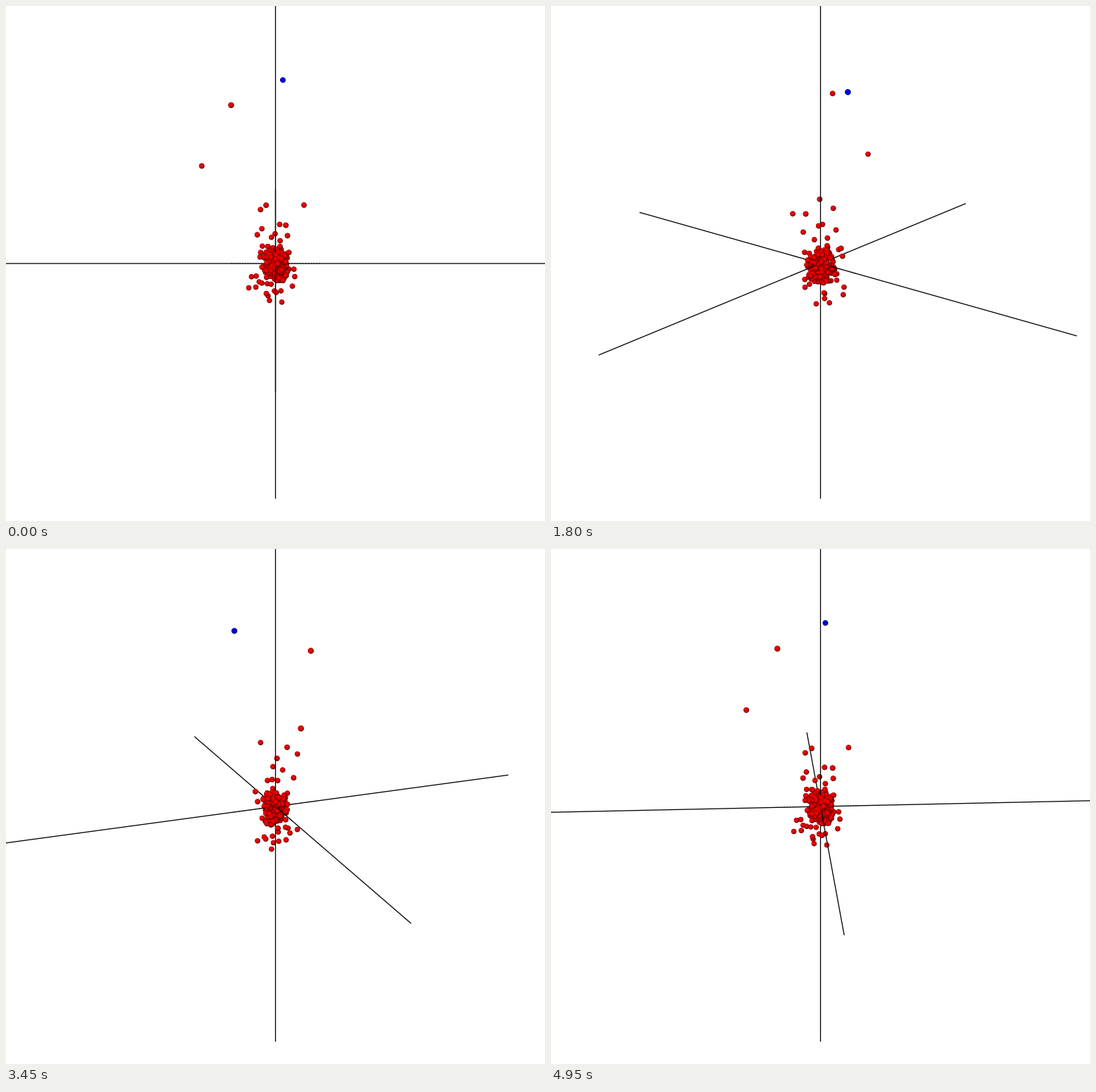
Animation, 765 px wide and 732 px high, one loop 5000 ms. Source, as a matplotlib script:

```python
import numpy as np
import matplotlib.pyplot as plt
from matplotlib.animation import FuncAnimation
from matplotlib.collections import LineCollection

W, H, DPI = 765, 732, 100
FRAMES, INTERVAL = 100, 50

# Orbiting camera: distance, focal length in pixels, elevation
DIST, FOCAL = 3.47, 1354.5
SIN_E, COS_E = np.sin(np.radians(20)), np.cos(np.radians(20))

DOT = 0.0198          # sphere diameter
AXIS_WIDTH = 1.3      # pixels
PT = 72 / DPI         # points per pixel

BLUE_POINT = [(0.0262, 0.642, -0.139)]
OUTLIERS = [
    (-0.149, 0.591, 0.067), (-0.2595, 0.361, -0.0134), (0.102, 0.216, -0.018),
    (-0.033, 0.230, 0.031), (-0.0535, 0.200, -0.0153), (0.036, 0.178, 0.100),
    (0.015, 0.148, -0.0035), (-0.0493, 0.1225, -0.032), (-0.0647, 0.1245, 0.0437),
    (0.0425, 0.1215, 0.045), (-0.0013, 0.1038, -0.0312), (0.0165, 0.0925, 0.015),
    (0.0234, -0.1516, 0.001), (-0.0223, -0.1555, -0.0245), (-0.031, -0.111, -0.082),
    (-0.061, -0.0955, -0.062), (-0.098, -0.0945, 0.002), (-0.0715, -0.0815, 0.0278),
    (-0.0875, -0.050, 0.004), (-0.071, -0.0565, -0.0197), (0.0205, -0.1217, -0.0365),
    (-0.0272, -0.1265, 0.002), (-0.033, -0.0885, 0.073), (0.0615, -0.080, 0.022),
    (0.070, -0.0452, 0.0154), (0.0675, -0.0262, -0.0105), (-0.004, -0.113, -0.0135),
    (0.0025, -0.093, 0.051), (-0.050, -0.080, -0.009), (-0.015, 0.0727, -0.083),
    (-0.028, 0.0385, -0.0795), (-0.048, 0.051, -0.046), (0.023, 0.0365, 0.056),
    (-0.013, -0.033, -0.057), (0.049, 0.038, -0.013), (-0.056, 0.027, 0.006),
    (-0.0535, 0.046, 0.010),
]

# Sphere shading, from the dark rim inwards: relative size, shift, brightness
SHADES = [(1.0, 0.0, 0.40), (0.86, -0.05, 0.76), (0.66, -0.09, 0.92)]


def make_cluster(count, seed=4):
    """Dense upright ellipsoid of points around the origin."""
    rng = np.random.default_rng(seed)
    pts = rng.normal(size=(count * 3, 3)) * (0.024, 0.037, 0.024)
    inside = ((pts / (0.054, 0.084, 0.054)) ** 2).sum(axis=1) < 1
    return pts[inside][:count] + (0, -0.006, 0)


def make_axes():
    """Three axes, cut finely near the origin so that depth sorting works."""
    knots = np.concatenate([[-1], np.linspace(-0.16, 0.16, 33), [1]])
    lines = [np.outer(knots, unit) for unit in np.eye(3)]
    starts = np.concatenate([line[:-1] for line in lines])
    ends = np.concatenate([line[1:] for line in lines])
    return starts, ends


def project(pts, angle):
    """Turn points about the vertical axis; return screen x, y and depth."""
    x, y, z = pts.T
    right = x * np.cos(angle) - z * np.sin(angle)
    near = x * np.sin(angle) + z * np.cos(angle)
    depth = DIST - near * COS_E - y * SIN_E
    sx = W / 2 + FOCAL * right / depth
    sy = H / 2 - FOCAL * (y * COS_E - near * SIN_E) / depth
    return sx, sy, depth


dots = np.vstack([BLUE_POINT, OUTLIERS, make_cluster(240)])
hues = np.tile([1.0, 0.0, 0.0], (len(dots), 1))
hues[0] = (0, 0, 1)
axis_starts, axis_ends = make_axes()

dot_colors = np.vstack([hues * level for _, _, level in SHADES])
colors = np.vstack([np.zeros((len(axis_starts), 3)), dot_colors])

fig = plt.figure(figsize=(W / DPI, H / DPI), dpi=DPI, facecolor="white")
ax = fig.add_axes([0, 0, 1, 1])
ax.set_xlim(0, W)
ax.set_ylim(H, 0)
ax.axis("off")

# Spheres are near-zero-length strokes with round caps
scene = LineCollection([], capstyle="round")
scene.set_snap(False)
ax.add_collection(scene, autolim=False)


def draw(frame):
    angle = 2 * np.pi * frame / FRAMES

    x0, y0, d0 = project(axis_starts, angle)
    x1, y1, d1 = project(axis_ends, angle)
    segs = [np.stack([x0, y0, x1, y1], axis=1)]
    widths = [np.full(len(x0), AXIS_WIDTH)]
    depths = [(d0 + d1) / 2]

    x, y, d = project(dots, angle)
    size = DOT * FOCAL / d
    for scale, shift, _ in SHADES:
        cx, cy = x + shift * size, y + shift * size
        segs.append(np.stack([cx - 0.01, cy, cx + 0.01, cy], axis=1))
        widths.append(size * scale)
        depths.append(d)

    order = np.argsort(-np.concatenate(depths), kind="stable")
    scene.set_segments(np.concatenate(segs)[order].reshape(-1, 2, 2))
    scene.set_linewidths(np.concatenate(widths)[order] * PT)
    scene.set_colors(colors[order])
    return [scene]


anim = FuncAnimation(fig, draw, frames=FRAMES, interval=INTERVAL,
                     init_func=lambda: draw(0), repeat=True, repeat_delay=0)

plt.show()
```
